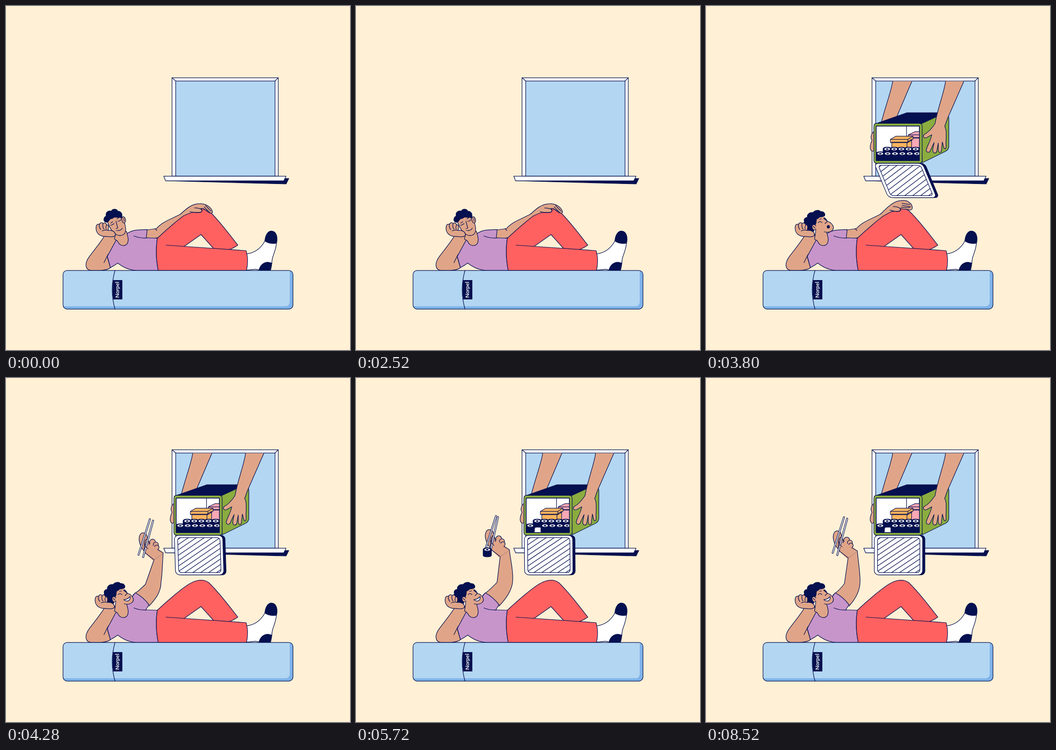
These frames come from a looping animation (748 by 748 pixels, 8880 ms). An HTML page:

```html
<!DOCTYPE html>
<html lang="en">
<head>
<meta charset="utf-8">
<title>Dinner in bed</title>
<style>
  html, body { margin: 0; width: 100%; height: 100%; overflow: hidden; background: #fff0d6; }
  svg { display: block; width: 100vw; height: 100vh; }
  svg * { vector-effect: non-scaling-stroke; }
  .ink { stroke: #04104f; stroke-width: 1.25; stroke-linejoin: round; stroke-linecap: round; }
  .line { fill: none; }
  .navy { fill: #04104f; }
  .white { fill: #fff; }
  .blue { fill: #b3d6f2; }
  .skin { fill: #e0a588; }
  .shirt { fill: #c795ca; }
  .red { fill: #ff6161; }
  .green { fill: #8bac3f; }
  .orange { fill: #fdb45e; }
  .pink { fill: #f9a8b4; }
  .tag { font: 700 11.5px Lato, "Open Sans", sans-serif; fill: #fff; stroke: none; text-anchor: middle; }
</style>
</head>
<body>
<svg viewBox="0 0 748 748" class="ink">
  <defs>
    <clipPath id="below"><rect y="163.5" width="748" height="585"/></clipPath>
    <clipPath id="inside"><rect x="370" y="261" width="94" height="75"/></clipPath>
    <clipPath id="panel"><rect x="7" y="5" width="92" height="76" rx="6"/></clipPath>
    <g id="roll">
      <path class="navy" d="M-9,0 C-9,-5.500 9,-5.500 9,0 V12 C9,17 -9,17 -9,12Z"/>
      <ellipse class="white" rx="7" ry="3.3"/>
      <ellipse class="navy" rx="2.2" ry="1"/>
    </g>
  </defs>

  <!-- window -->
  <path class="white" d="M361,156 H592 V370 H361Z"/>
  <path class="blue" d="M369,163 H585 V370 H369Z"/>
  <path class="line" d="M361,156 L369,163 M592,156 L585,163"/>
  <path class="navy" d="M348,380 H604 L608,375 H615 L609,387Z"/>
  <path class="white" d="M343,370 H609 L604,380 H347Z"/>

  <!-- delivery -->
  <g clip-path="url(#below)"><g id="delivery">
    <path class="skin" d="M407,140 L406,163 C404,182 390,218 381,254 L410,256 L416,238 L448,163 L456,140Z"/>
    <path class="skin" d="M370,270 C361,273 356,284 361,292 C357,300 355,311 360,315 C364,317 368,314 370,310Z"/>
    <path class="navy" d="M366,257 L437,232 H519 L470,256Z"/>
    <path class="green" d="M468,256 L514,235 Q527,233 528,244 V305 Q528,312 521,316 L470,341Z"/>
    <rect class="green" x="365" y="255" width="105" height="87" rx="6"/>
    <rect class="white" x="370" y="261" width="94" height="75"/>
    <g clip-path="url(#inside)">
      <path class="line" d="M436,261 V300"/>
      <path class="pink" d="M443,286 H470 V310 H443Z M440,280 L455,273 H470 V287 H440Z M440,280 H470"/>
      <path class="orange" d="M404,296 H437 L447,290 V312 H404Z M401,290 L413,283 H450 V290 L439,297 H401Z"/>
      <path class="line" d="M401,290 H439 V297 M439,290 L450,283 M437,297 V312"/>
      <g id="rolls"></g>
    </g>
    <rect class="line" x="370" y="261" width="94" height="75"/>
    <g id="lid">
      <rect class="navy" x="5" width="105" height="86" rx="8"/>
      <rect id="outer" class="green" width="105" height="87" rx="7"/>
      <g id="inner">
        <rect class="white" width="105" height="86" rx="9"/>
        <rect class="line" x="7" y="5" width="92" height="76" rx="6"/>
        <path id="stripes" class="line" clip-path="url(#panel)"/>
      </g>
    </g>
    <path class="skin" d="M522,140 L521,163 C519,184 503,225 498,256 C491,266 484,275 475,279
      C470,283 474,289 480,286 L491,280 C488,295 480,305 479,313 C479,319 486,320 488,314
      L496,297 L493,313 C493,321 500,322 502,315 L505,298 V313 C506,321 512,320 512,313
      L514,296 L517,308 C519,313 523,310 522,303 C521,290 525,272 519,262 L525,245 L561,163 L567,140Z"/>
  </g></g>

  <!-- raised arm -->
  <g id="raised">
    <path id="limb" class="skin"/>
    <g id="grip">
      <path class="skin" d="M292,376 C279,366 273,346 279,336 C284,329 293,333 294,341 L300,362Z"/>
      <path class="skin" stroke="none" d="M307,393 L290,377 C284,368 287,352 292,346 C299,348 308,360 318,367 L330,376Z"/>
      <path class="line" d="M309,391 L291,377 C285,368 288,352 292,346 C297,347 299,352 298,360"/>
      <g id="sticks"></g>
      <ellipse class="skin" cx="306" cy="353" rx="6.5" ry="7"/>
      <ellipse class="skin" cx="313" cy="358" rx="5.5" ry="5.5"/>
      <ellipse class="skin" cx="315" cy="364" rx="5" ry="5"/>
      <path class="skin" stroke="none" d="M291,366 L302,355 L318,369 L322,376 L304,383Z"/>
      <path class="line" d="M290,349 C288,358 290,364 296,367 M317,369 L329,376"/>
    </g>
  </g>

  <!-- sleeper -->
  <g id="resting">
    <path class="skin" d="M306,487 L327,484 C341,468 361,463 380,452 L394,444 L402,456 L340,502 L322,505 L304,504Z"/>
    <path class="line" d="M324,484 L328,488"/>
  </g>
  <path id="shirtDown" class="shirt" d="M243,500 C236,515 228,530 220,544 L227,569 Q236,564 243,559 C254,568 268,574 283,575
    H331 C326,550 326,525 329,505 L305,504 L307,486 C287,486 272,487 262,496Z"/>
  <path id="shirtUp" class="shirt" d="M243,500 C236,515 228,530 220,544 L227,569 Q236,564 243,559 C254,568 268,574 283,575
    H331 C326,550 326,525 329,505 L304,504 L311,493 Q298,476 281,467 L262,491Z"/>
  <path class="line" d="M278,500 C288,504 297,505 306,504.5"/>
  <path class="red" d="M329,505 C350,485 385,455 400,447 C415,438 431,437 441,445 C460,463 485,495 504,520
    Q491,529 480,531 L452,528 L424,497 L387,523 L340,560Z"/>
  <path class="white" d="M523,539 C540,537 553,529 563,511 C564,498 570,489 578,489.500 C588,490 591,503 588,516
    C587,528 583,537 580,546 C577,556 579,563 575,575 H551 C545,570 536,574 523,574Z"/>
  <path class="navy" d="M563,511 C564,498 570,489 578,489.500 C588,490 591,503 588,516 Q573,518 563,511Z
    M550,575 C552,564 560,557 570,557 L578,559 L574,575Z"/>
  <path class="red" stroke="none" d="M329,505 L348,520 L522,532 C526,545 526,561 523,575 H331 C326,550 326,525 329,505Z"/>
  <path class="line" d="M348,520 L522,532 C526,545 526,561 523,575 H331 C326,550 326,525 329,505"/>
  <g id="restingHand">
    <path id="hand" class="skin"/>
    <path id="fingers" class="line"/>
  </g>

  <path class="skin" d="M214,500 C205,515 190,533 181,545 C170,560 172,575 186,575 H205 Q222,574 227,569 L220,545 L240,508 L236,496Z"/>
  <path class="line" d="M213,558 L222,540"/>
  <path class="skin" d="M239,486 L236,507 Q241,509 243,512 C247,522 258,524 264,516 C268,508 264,499 262,490Z"/>

  <g id="headFront">
    <path class="skin" d="M220,467 C224,480 230,491 240,497 C249,502 259,498 260,489 C261,482 259,476 257,469 L249,452 L228,456Z"/>
    <ellipse class="skin" cx="256" cy="465" rx="4" ry="7" transform="rotate(-10 256 465)"/>
    <path class="line" d="M256,461 L257,468"/>
    <path class="navy" d="M221,470 C214,471 211,466 214,460 C216,457 218,457 218,456 C216,449 222,444 229,446
      C231,441 240,440 243,446 C250,446 253,452 252,457 C253,461 250,463 248,459 C243,462 238,457 234,460
      C231,464 226,461 225,465Z"/>
    <path class="line" d="M227,477 Q232,476 235,473 M243,468 Q248,468 250,464 M228,472 L232,469 M241,463 L246,460
      M239,468 L243,483 L239,484 M240,488 Q249,490 253,483"/>
  </g>
  <g id="headUp">
    <g id="jaw">
      <path class="skin" stroke="none" d="M237,474 L240,492 L257,493 L262,492 C272,492 278,487 277,480 C275,474 270,470 264,468
        L258,460 C251,454 243,459 238,464Z"/>
      <path class="line" d="M257,491 L262,492 C272,492 278,487 277,480 C275,474 270,470 264,468 L258,460"/>
    </g>
    <path class="navy" d="M221,487 C213,484 210,475 214,469 C212,463 216,459 221,460 C218,454 225,448 233,449
      C237,443 246,443 249,447 C255,446 260,451 258,456 C256,459 250,458 247,459 C245,462 242,462 240,464
      C240,469 240,473 237,476 L234,490Z"/>
    <path class="skin" d="M239,478 C234,472 229,477 231,482 C232,487 236,489 239,485"/>
    <path class="line" d="M233,479 L237,483 M244,471 Q248,466 252,471 M247,464 L251,463 M256,461 L262,464 M256,462 L264,468 L259,473"/>
    <path id="smile" class="white" d="M256,482 Q264,482 270,475 C271,484 264,488 256,482Z"/>
    <ellipse id="gasp" class="navy" cx="266" cy="480" rx="2.600" ry="3"/>
    <g id="wide">
      <path class="navy" d="M258,482 C260,475 269,470 273,474 C275,480 270,486 264,487 C260,487 258,485 258,482Z"/>
      <path class="white" stroke="none" d="M260,480 C263,475 268,473 272,475 L270,478 Q265,478 261,482Z"/>
    </g>
    <path id="chew" class="line"/>
  </g>
  <g id="fist">
    <path class="skin" d="M216,501 C205,501 197,495 196,486 C195,477 198,473 203,475 C204,471 209,470 211,473
      C214,470 218,472 219,476 C223,475 224,480 222,488 C232,487 238,491 238,499 C233,503 226,502 216,501Z"/>
    <path class="line" d="M203,475 Q202,481 206,486 M211,473 Q209,480 213,485 M219,476 Q216,481 218,485 M209,489 Q216,486 222,488"/>
  </g>
  <use id="bite" href="#roll"/>

  <!-- mattress -->
  <rect x="124" y="575" width="500" height="84" rx="9" fill="#7eb2ea" stroke="none"/>
  <path class="blue" stroke="none" d="M133,575 H617 V643 Q617,653 607,653 H126 Q124,651 124,648 V584 Q124,575 133,575Z"/>
  <rect class="line" x="124" y="575" width="500" height="84" rx="9"/>
  <path class="line" d="M237,575 Q225,617 237,659"/>
  <path class="navy" stroke="none" d="M232.500,596 H253 V638 H233 Q230,617 232.500,596Z"/>
  <text class="tag" transform="translate(246 617) rotate(-90)">Norpel</text>
</svg>

<script>
const LOOP = 8880;
const el = Object.fromEntries([...document.querySelectorAll('[id]')].map(n => [n.id, n]));
const clamp = u => Math.max(0, Math.min(1, u));
const ease = u => u * u * (3 - 2 * u);
const span = (t, a, b) => ease(clamp((t - a) / (b - a)));
const show = (node, on) => node.setAttribute('visibility', on ? 'inherit' : 'hidden');
const move = (node, value) => node.setAttribute('transform', value);

// Rows are [time, ...values].
function pose(rows, t) {
  const i = rows.findIndex(r => r[0] > t);
  if (i < 0) return rows.at(-1).slice(1);
  if (i === 0) return rows[0].slice(1);
  const a = rows[i - 1], b = rows[i], u = span(t, a[0], b[0]);
  return a.slice(1).map((v, k) => v + (b[k + 1] - v) * u);
}

// Blends two paths that share one structure.
function blend(a, b, u) {
  const target = b.match(/[\d.]+/g);
  let i = 0;
  return a.replace(/[\d.]+/g, n => +n + (target[i++] - n) * u);
}

const HAND = [
  'M380,452 C392,441 404,430 420,430 C430,429 437,433 441,436 C446,440 449,445 449,449 C446,452 442,450 438,447 C434,443 430,441 424,440 C428,444 426,449 420,449 L404,449 C399,451 394,452 389,455',
  'M380,452 C392,439 406,424 418,419 C430,416 438,414 441,419 C447,421 450,428 448,434 C446,440 442,438 436,438 C430,440 424,443 420,440 C422,443 419,444 414,444 L404,445 C399,448 394,451 389,455'
];
const FINGERS = [
  'M434,434 L446,446 M431,437 L443,449 M428,440 L438,446 M400,447 C408,449 424,451 426,446 C427,441 418,439 410,439',
  'M420,425 L441,420 M422,431 L447,426 M421,436 L448,432 M400,441 C408,445 420,447 421,442 C421,437 412,433 404,434'
];
// hand x, hand y, elbow x, elbow y, pinch
const REACH = [
  [4000, 60, 20, 10, 8, 0], [4400, 0, 0, 0, 0, 0], [4680, -32, 18, 0, 0, 1], [4800, -32, 18, 0, 0, 1],
  [5240, 116, -61, 32, -16, 0], [5400, 116, -61, 32, -16, .4], [5840, -20, 10, 0, 0, .4],
  [6160, -10, 6, 0, 0, .4], [6440, -22, 20, 0, 0, .4], [6600, 0, 0, 0, 0, 0]
];
const DROP = [[2480, -1, -192], [2840, -1, 8], [2960, -1, 1], [3200, -1, 1], [3360, 0, 0]];
const GRAB = 5320, TOSS = 6540, EAT = 6890;

function limb(hx, hy, ex, ey) {
  const ox = 335 + ex, oy = 442 + ey, rx = 329 + hx, ry = 376 + hy;
  return `M276,472 Q290,462 ${301 + ex},${447 + ey} L${309 + hx},${391 + hy} L${rx},${ry}
    C${rx + (ox - rx) * .4},${ry + (oy - ry) * .4} ${ox + Math.max(hx, 0) * .25},${oy - 22} ${ox},${oy}
    C${ox},${oy + 24} 322,484 311,496`;
}

function drawMan(t) {
  const raised = t >= 4000, up = t >= 2600;
  const lift = t < 2080 ? (1 - Math.cos(t / 1040 * 2 * Math.PI)) / 2 : .55 * span(t, 3640, 3800);
  el.hand.setAttribute('d', blend(...HAND, lift));
  el.fingers.setAttribute('d', blend(...FINGERS, lift));
  for (const part of [el.resting, el.restingHand]) {
    move(part, `rotate(${-30 * span(t, 3820, 4000)} 306 496)`);
    show(part, !raised);
  }
  show(el.shirtDown, !raised);
  show(el.shirtUp, raised);
  show(el.raised, raised);

  show(el.headFront, !up);
  show(el.headUp, up);
  move(el.fist, `translate(${up ? -2 : 0} 0)`);
  const gasp = t >= 3480 && t < 4200;
  const wide = t >= 6240 && t < EAT;
  const chew = t >= EAT && t < 8000;
  show(el.gasp, up && gasp);
  show(el.wide, up && wide);
  show(el.chew, up && chew);
  show(el.smile, up && !gasp && !wide && !chew);
  const bite = chew ? Math.sin((t - EAT) / 140 * Math.PI) * (1 - span(t, 7700, 7840)) : 0;
  move(el.jaw, `translate(${wide ? 1 : 0} ${wide ? 1 : bite})`);
  el.chew.setAttribute('d', `M259,${483 + bite} Q265,${484 + 2 * bite} 270,478`);
}

function drawFood(t) {
  const [hx, hy, ex, ey, pinch] = pose(REACH, t);
  el.limb.setAttribute('d', limb(hx, hy, ex, ey));
  move(el.grip, `translate(${hx} ${hy})`);
  move(el.sticks.lastChild, `rotate(${-6.7 * pinch} 291 365)`);
  show(taken, t < GRAB);
  show(el.bite, t >= GRAB && t < EAT);
  const s = t - TOSS;
  const [x, y] = s < 0 ? [281 + hx, 382 + hy]
    : [274 - .1163 * s + .000269 * s * s, 390 - .5297 * s + .00215 * s * s];
  move(el.bite, `translate(${x} ${y}) rotate(${s < 0 ? 0 : 8 * clamp(s / 140)}) translate(0 -6)`);
}

function drawBox(t) {
  const [x, y] = pose(DROP, t);
  move(el.delivery, `translate(${x} ${y})`);
  const flip = -Math.cos(Math.PI * span(t, 3380, 3948));
  const s = t - 3800;
  const swing = .36 * Math.exp(-s / 560) * Math.cos(s / 306.7 * Math.PI) * span(t, 3540, 3760);
  const shut = (1 - flip) / 2;
  move(el.lid, `matrix(1 0 ${swing} ${flip} ${366 - 5 * shut} ${342 + 2 * shut})`);
  show(el.outer, flip < 0);
  show(el.inner, flip >= 0);
}

const addRoll = (x, y) => {
  el.rolls.insertAdjacentHTML('beforeend', `<use href="#roll" x="${x}" y="${y}"/>`);
  return el.rolls.lastChild;
};
for (let i = 0; i < 5; i++) addRoll(394 + 15.5 * i, 311);
const front = [];
for (let i = 0; i < 6; i++) front.push(addRoll(379 + 16 * i, 321));
const taken = front[1];
taken.insertAdjacentHTML('beforebegin', '<path class="white" stroke="none" d="M390,325 H401 V335 H390Z"/>');

let stripes = '';
for (let c = 14; c < 150; c += 11.5) stripes += `M0,${c} L105,${c - 70}`;
el.stripes.setAttribute('d', stripes);

for (const d of ['M300,303 L275.500,380', 'M307,306 L285.500,385'])
  el.sticks.insertAdjacentHTML('beforeend',
    `<g><path d="${d}" stroke-width="4"/><path d="${d}" stroke="#fff" stroke-width="1.7"/></g>`);

const start = performance.now();
function frame() {
  const t = (performance.now() - start) % LOOP;
  drawMan(t);
  drawFood(t);
  drawBox(t);
  requestAnimationFrame(frame);
}
frame();
</script>
</body>
</html>
```
